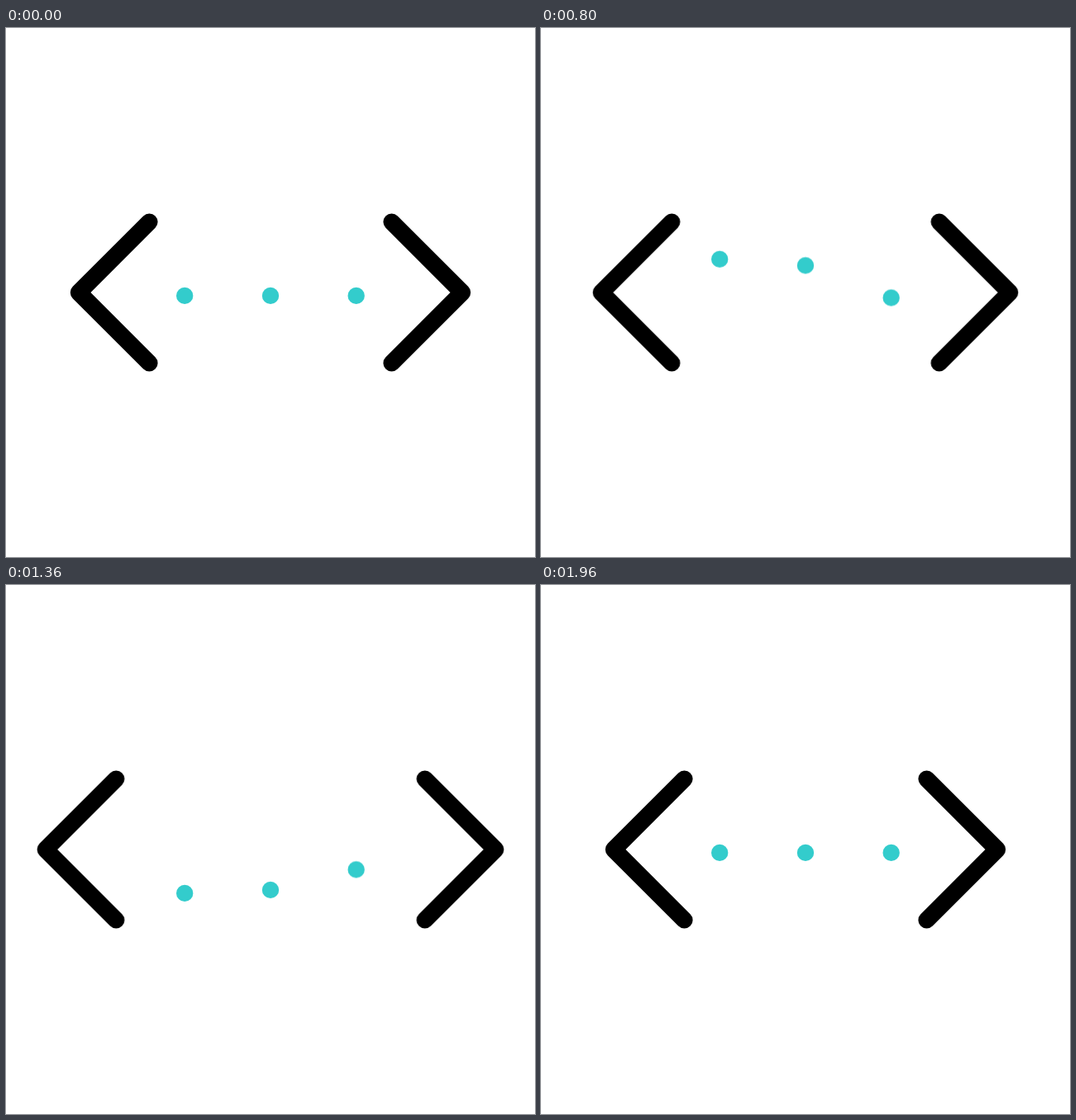
Animation, 640 px wide and 640 px high, one loop 2 s. Source, as an HTML page:

```html
<!DOCTYPE html>
<html lang="en">
<head>
<meta charset="utf-8">
<title>Code brackets</title>
<style>
  html, body { margin: 0; width: 100%; height: 100%; overflow: hidden; background: #fff; }
  svg { display: block; width: 100%; height: 100%; }

  .bracket { fill: none; stroke: #000; stroke-width: 20.4; stroke-linecap: round; stroke-linejoin: round; }
  .dot { fill: #33cccc; }

  /* The clock below sets --t; the paused animations are read at that time. */
  .bracket, .dot {
    animation: 2000ms linear calc(var(--lag, 0ms) - var(--t, 0ms)) both paused;
  }
  .bracket { animation-name: spread; }
  .dot { animation-name: wave; }

  @keyframes spread {
    0%   { transform: translateX(0); }
    2%   { transform: translateX(0); animation-timing-function: cubic-bezier(.63, 0, .49, 1); }
    26%  { transform: translateX(-45px); animation-timing-function: cubic-bezier(.5, 0, .5, 1); }
    50%  { transform: translateX(0); animation-timing-function: cubic-bezier(.5, 0, .5, 1); }
    74%  { transform: translateX(-45px); animation-timing-function: cubic-bezier(.5, 0, .28, 1); }
    98%, 100% { transform: translateX(0); }
  }
  @keyframes wave {
    0%   { transform: translateY(0); }
    2%   { transform: translateY(0); animation-timing-function: cubic-bezier(.65, 0, .545, 1); }
    26%  { transform: translateY(-44.8px); animation-timing-function: cubic-bezier(.45, 0, .55, 1); }
    54%  { transform: translateY(49.8px); animation-timing-function: cubic-bezier(.45, 0, .43, 1); }
    82%, 100% { transform: translateY(0); }
  }
</style>
</head>
<body>
<svg viewBox="0 0 640 640">
  <path class="bracket" d="M173.4 234.6 88 320l85.4 85.4"/>
  <g transform="matrix(-1 0 0 1 640 0)">
    <path class="bracket" d="M173.4 234.6 88 320l85.4 85.4"/>
  </g>
  <circle class="dot" cx="216.2" cy="323.9" r="10.2" style="--lag: 320ms"/>
  <circle class="dot" cx="320" cy="323.9" r="10.2" style="--lag: 160ms"/>
  <circle class="dot" cx="423.7" cy="323.9" r="10.2"/>
</svg>
<script>
  const LOOP = 2000, STEP = 40;
  const root = document.documentElement;
  const start = performance.now();

  // 25 steps per second; the small bias absorbs timer rounding.
  function tick() {
    const t = (performance.now() - start + 2) % LOOP;
    root.style.setProperty('--t', Math.floor(t / STEP) * STEP + 'ms');
    requestAnimationFrame(tick);
  }
  tick();
</script>
</body>
</html>
```
